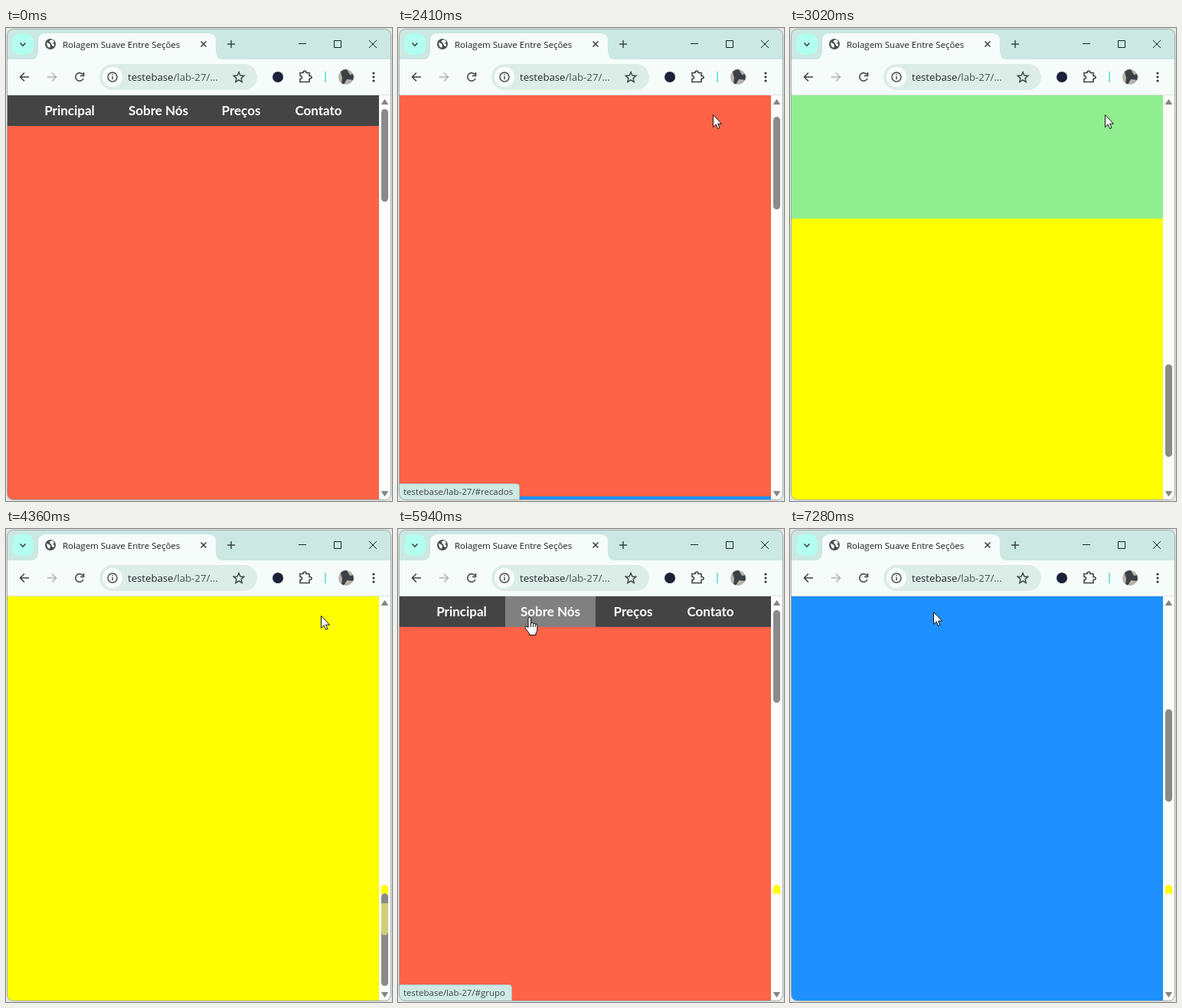
Write an HTML page that moves like this. It is 504 px wide and 618 px high and loops after 8 s.

```html
<!DOCTYPE html>
<html lang="pt">
<head>
<meta charset="utf-8">
<style>
html, body { margin: 0; width: 100%; height: 100%; overflow: hidden; background: #e3e6e5; }
svg { display: block; }
text { font-family: "Open Sans", "Noto Sans", sans-serif; }
#nav text { font: 700 17px Lato, sans-serif; fill: #fff; text-anchor: middle; }
.line { fill: none; stroke: #3c4644; stroke-width: 1.6; }
.thin { fill: none; stroke-width: 1; }
</style>
</head>
<body>
<svg width="504" height="618" viewBox="0 0 504 618">
  <defs>
    <clipPath id="window"><rect x="1.5" y="1.5" width="501" height="615" rx="8"/></clipPath>
    <clipPath id="view"><path d="M2 88H487V616H2z"/></clipPath>
    <clipPath id="face"><circle cx="444" cy="64" r="10"/></clipPath>
  </defs>
  <g clip-path="url(#window)">
    <rect id="header" width="504" height="41"/>
    <rect id="menu" x="8" y="7" width="28" height="28" rx="10"/>
    <path class="line" d="M18.5 19.5l3.5 3.5 3.5-3.5"/>
    <path fill="#f5fcfa" d="M0 41H32Q42 41 42 31V17Q42 7 52 7H264Q274 7 274 17V31Q274 41 284 41H504V88H0z"/>

    <!-- tab -->
    <circle cx="58" cy="21" r="7" fill="#48514f"/>
    <path fill="#f5fcfa" d="M53 19l3 1 2 2-1 4-3-2zM57 16l4-1 2 3-2 2 2 1v3l-3-1-1-3-2-2z"/>
    <text x="74" y="26" font-size="11.5" fill="#1b2120">Rolagem Suave Entre Seções</text>
    <path class="line" d="M254.5 17.500l7 7m0-7l-7 7"/>
    <path id="plus" class="thin" style="stroke-width:1.5" d="M289 21h10m-5-5v10"/>
    <path id="controls" class="thin" d="M382 20.500h10M428.500 16.500h9v9h-9zM474 16l10 10m0-10l-10 10"/>

    <!-- toolbar -->
    <path class="line" d="M30 64H19m5-5.500l-5.500 5.500 5.500 5.500"/>
    <path class="line" style="stroke:#b1b8b6" d="M54 64H65m-5-5.500l5.500 5.500-5.500 5.500"/>
    <path class="line" d="M100.500 61A5.300 5.300 0 1 0 101 66M101.500 58v4.500h-4.500"/>
    <rect x="122" y="47" width="206" height="34" rx="17" fill="#dcede8"/>
    <circle cx="139" cy="64" r="13" fill="#f8fdfb"/>
    <path class="line" style="stroke-width:1.400" d="M133 64a6 6 0 1 0 12 0a6 6 0 1 0-12 0M139 63v4.200M139 60.300v1.500"/>
    <text x="159" y="69" font-size="13.200" fill="#1f2726">testebase<tspan fill="#46514f">/lab-27/...</tspan></text>
    <path class="line" style="stroke-width:1.400" d="M304 57.500l1.900 4.500 4.900.4-3.700 3.200 1.100 4.800-4.200-2.600-4.200 2.600 1.100-4.800-3.700-3.200 4.900-.4z"/>
    <circle cx="355" cy="64" r="7" fill="#1a2138"/>
    <path class="line" d="M384 58.500h4q0-2.500 2-2.500t2 2.500h4v4q3 0 3 2t-3 2v4h-12v-4q2.500 0 2.500-2t-2.500-2z"/>
    <path stroke="#83e2dc" stroke-width="2" d="M417 57v14"/>
    <g clip-path="url(#face)">
      <path fill="#b8b3ab" d="M434 54h20v20h-20z"/>
      <path fill="#3b4146" d="M436 54h9l4 7 5-1v8l-9-1-4 7h-3l1-9z"/>
      <path fill="#777b7b" d="M434 68l7 6h-7zM449 54l5 3v-3z"/>
    </g>
    <path fill="none" stroke="#343d3b" stroke-width="3.200" stroke-linecap="round" d="M480 59h.01M480 64h.01M480 69h.01"/>
    <path stroke="#d9e4e1" d="M0 87.500H504"/>

    <!-- page -->
    <g clip-path="url(#view)">
      <g id="page"><g id="nav"><path fill="#444" d="M0 88H504V128H0z"/></g></g>
      <g id="trail" fill="#777">
        <path d="M104 128l6 7-1 1z" opacity=".5"/>
        <path d="M143 128h12v12l-3 4h-7l-2-3z" opacity=".3"/>
        <path d="M172 128h7l4 4 6-1v5q-6 5-12 1z" opacity=".6"/>
      </g>
    </g>

    <!-- scrollbar -->
    <path fill="#fcfcfc" d="M487 88H504V618H487z"/>
    <path fill="#868686" stroke="#868686" stroke-linejoin="round" d="M490.500 99.500h8l-4-6zM490.500 605.500h8l-4 6z"/>
    <rect id="thumb" x="490" width="9" height="121" rx="4.500" fill="#8a8a8a"/>
    <path id="tint" fill="#cfcf79" d="M490 489h9v37q0 4.500-4.500 4.500t-4.500-4.500z"/>
    <path id="mark" fill="#ff0" d="M490 478.500V469.500q0-4.500 4.500-4.500t4.500 4.500v9q-1-2.500-4.500-2.500t-4.500 2.500z"/>

    <g id="status">
      <path id="bubble" fill="#cfe9e3" stroke="#a9bfba"/>
      <text id="link" x="7" y="610" font-size="11.500" fill="#3c4745"/>
    </g>
  </g>
  <rect x="1.500" y="1.500" width="501" height="615" rx="8" fill="none" stroke="#a3adaa"/>

  <g id="cursor" fill="#fff" stroke="#111" stroke-linejoin="round">
    <path id="arrow" d="M.5 .5V16.500L4.200 13 6.600 18.500 9 17.500 6.600 12.200H11.500z"/>
    <path id="hand" d="M-2 14V2Q-2 0-.3 0T1.500 2V8Q3 6.700 4.500 8.300 6 7.500 7.300 9 9.800 8.700 9.800 11V16Q9.800 19 8 21V23.500H-.5V21.500L-5.500 15Q-7 12.500-5 12-3.500 12-2 14zM1.500 8V13M4.500 8.300V13M7.300 9V13"/>
  </g>
</svg>
<script>
const LOOP = 8000, VIEW = 528, NAV = 40, END = NAV + 3 * VIEW;
const $ = id => document.getElementById(id);
const show = (id, on) => $(id).setAttribute('visibility', on ? 'visible' : 'hidden');

function add(parent, tag, attrs) {
  const el = document.createElementNS('http://www.w3.org/2000/svg', tag);
  for (const key in attrs) el.setAttribute(key, attrs[key]);
  return parent.appendChild(el);
}

['tomato', 'dodgerblue', 'lightgreen', 'yellow'].forEach((fill, i) =>
  add($('page'), 'rect', { x: 0, y: 88 + NAV + i * VIEW, width: 504, height: VIEW, fill }));

const buttons = [['Principal', 30, 106], ['Sobre Nós', 140, 118], ['Preços', 261, 92], ['Contato', 357, 102]]
  .map(([label, x, width]) => {
    const box = add($('nav'), 'rect', { x, y: 88, width, height: NAV, fill: '#808080' });
    add($('nav'), 'text', { x: x + width / 2, y: 114 }).textContent = label;
    return { box, x, width };
  });

// time, x, y
const path = [
  [1380, 499, 156], [1520, 462, 136], [1790, 412, 114], [2070, 411, 113], [4620, 411, 113],
  [4850, 330, 116], [5050, 264, 120], [5120, 247, 120], [5330, 143, 120], [5480, 104, 115],
  [5650, 100, 112], [5800, 143, 120], [5940, 172, 115], [6080, 182, 109], [6650, 182, 109], [7280, 187, 108]
];
const links = [
  [0, ''], [2000, '#recados'], [2920, ''], [4760, '#recados'], [4870, '#planos'],
  [5110, '#grupo'], [5350, '#abertura'], [5780, '#grupo'], [6980, '']
];

function pointer(t) {
  const i = path.findIndex(p => p[0] > t);
  if (i < 0) return path.at(-1).slice(1);
  const [t0, x0, y0] = path[i - 1], [t1, x1, y1] = path[i], k = (t - t0) / (t1 - t0);
  return [x0 + (x1 - x0) * k, y0 + (y1 - y0) * k];
}

// cubic-bezier(.42, 0, .58, 1)
function ease(t, start, duration) {
  const p = Math.min(1, Math.max(0, (t - start) / duration));
  let u = p;
  for (let i = 0; i < 5; i++)
    u -= (1.26 * u - .78 * u * u + .52 * u ** 3 - p) / (1.26 - 1.56 * u + 1.56 * u * u);
  return u * u * (3 - 2 * u);
}

function draw(t) {
  const scroll = END * (ease(t, 2303, 920) - ease(t, 4370, 300)) + (NAV + VIEW) * ease(t, 6363, 920);
  $('page').setAttribute('transform', `translate(0 ${-Math.round(scroll)})`);
  $('thumb').setAttribute('y', 106 + 370 * scroll / END);

  const active = t < 240 || t >= 2270;
  $('header').setAttribute('fill', active ? '#cbe8e2' : '#d6e7e3');
  $('menu').setAttribute('fill', active ? '#b2fff0' : '#f5fcfa');
  $('plus').setAttribute('stroke', active ? '#3c4644' : '#6b7472');
  $('controls').setAttribute('stroke', active ? '#1c2220' : '#979f9d');

  const visible = t >= 1380;
  const [x, y] = visible ? pointer(t) : [-99, -99];
  let over = false;
  for (const b of buttons) {
    const hot = x >= b.x && x < b.x + b.width && y + scroll < 88 + NAV;
    b.box.setAttribute('opacity', hot ? 1 : 0);
    over ||= hot;
  }
  $('cursor').setAttribute('transform', `translate(${Math.round(x)} ${Math.round(y)})`);
  show('arrow', visible && !over);
  show('hand', visible && over);

  const link = links.findLast(l => l[0] <= t)[1];
  show('status', link);
  if (link) {
    $('link').textContent = 'testebase/lab-27/' + link;
    const right = Math.round($('link').getComputedTextLength()) + 15.5;
    $('bubble').setAttribute('d', `M1.5 595.5H${right - 4}q4 0 4 4V617H1.5z`);
  }

  show('mark', t >= 3130);
  show('tint', t >= 3220 && t < 4430);
  show('trail', t >= 5960 && t < 7140);
}

function tick() {
  draw(performance.now() % LOOP);
  requestAnimationFrame(tick);
}
tick();
</script>
</body>
</html>
```
